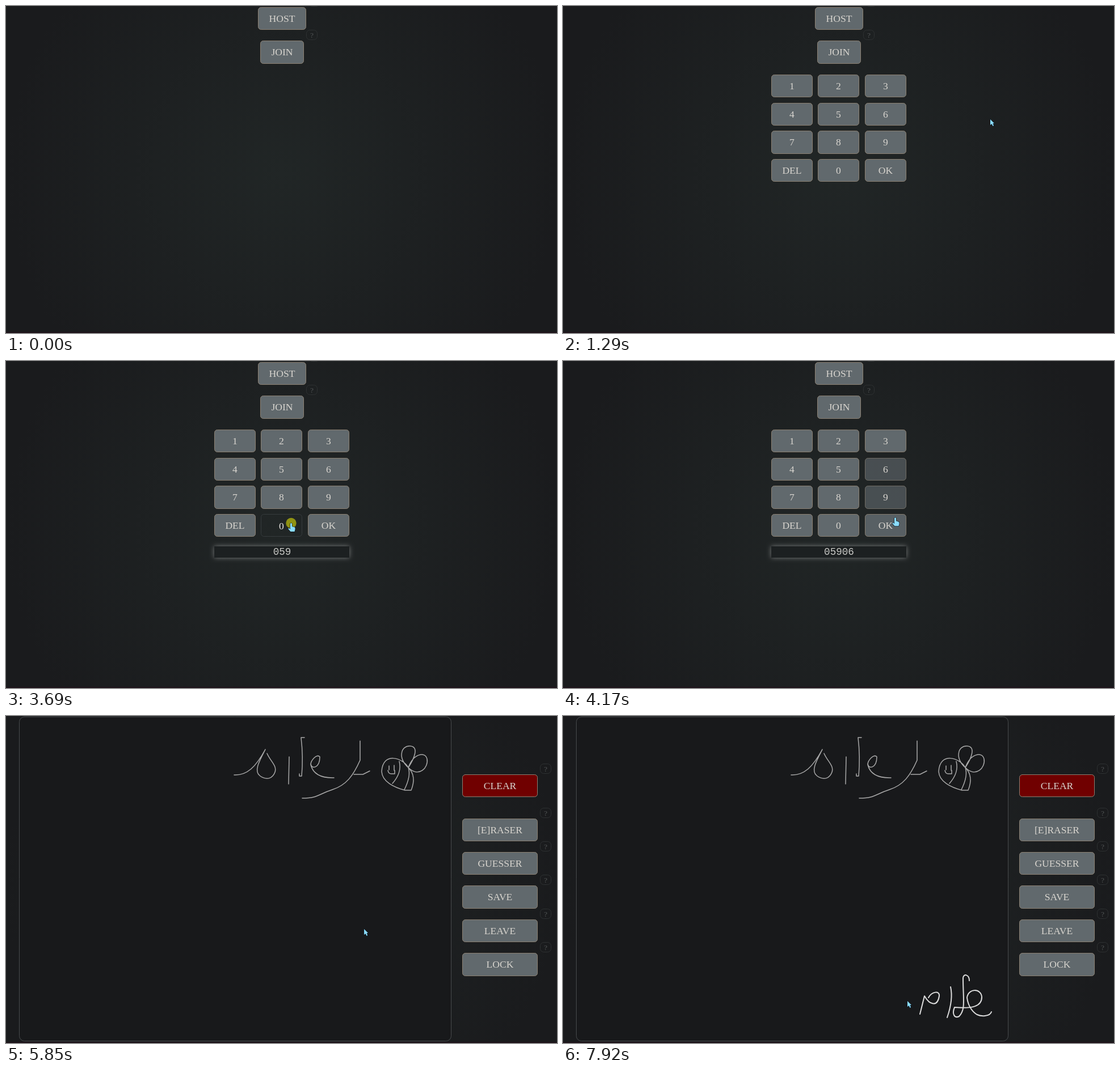
These frames come from a looping animation (971x577 px, 8000 ms). An HTML page with a canvas:

```html
<!DOCTYPE html>
<html lang="en">
<head>
<meta charset="utf-8">
<title>Shared drawing board</title>
<style>
  html, body { margin: 0; width: 100%; height: 100%; overflow: hidden; background: #1b1d1f; }
  canvas { display: block; }
</style>
</head>
<body>
<canvas id="stage" width="971" height="577"></canvas>
<svg width="0" height="0" style="position:absolute">
  <g fill="none">
    <path class="pen" d="M755 522C752 531 736 530 730 527S714 514 712 497C714 480 737 480 738 496C738 512 722 517 690 514C685 526 690 534 698 530C710 518 705 500 705 462C706 454 716 456 716 467"/>
    <path class="pen" d="M683 478Q688 500 677 532"/>
    <path class="pen" d="M644 497C650 486 664 484 663 494C660 514 646 510 637 494L629 526"/>
  </g>
</svg>
<script>
const ctx = document.getElementById('stage').getContext('2d');
const LOOP = 8000, KEYPAD_AT = 900, BOARD_AT = 4500, HOLD = 70;
const SERIF = '17.6px "Liberation Serif", "Times New Roman", serif';
const SMALL = '13.5px "Liberation Serif", "Times New Roman", serif';
const MONO = '17.6px "Liberation Mono", "Courier New", monospace';

const button = (label, x, y, w, help = false, color = '#61696d') => {
  const top = Math.round(y);
  return { label, x, y: top, w, h: Math.round(y + 40.4) - top, help, color };
};
const menu = [button('HOST', 444, 2, 85, true), button('JOIN', 448, 61.4, 77, true)];
const keys = ['1', '2', '3', '4', '5', '6', '7', '8', '9', 'DEL', '0', 'OK'].map((label, i) =>
  button(label, Math.round(367 + 82.4 * (i % 3)), 120.8 + 49.7 * Math.floor(i / 3), 73));
const tools = ['CLEAR', '[E]RASER', 'GUESSER', 'SAVE', 'LEAVE', 'LOCK'].map((label, i) =>
  button(label, 804, i ? 121.2 + 59.4 * i : 102.6, 133, true, i ? '#61696d' : '#700000'));

const lettering = new Path2D(
  'M402 104C425 105 440 90 457 59C446 80 436 98 448 106S470 110 474 99S466 80 460 66' +
  'M499 72L498 120M526 38H520Q524 72 521 106H517V102' +
  'M537 84C538 95 553 92 553 72C548 66 537 78 537 86Q543 110 578 109' +
  'M624 44V78C612 105 600 122 575 130S550 145 522 145M613 103H629L641 97');
const bee = new Path2D(
  'M709 91C700 74 664 62 662 98C663 116 684 126 703 131H714Q724 106 709 91' +
  'C690 74 696 52 712 53S720 74 709 91C718 66 739 62 742 76S728 110 709 91Q714 106 702 130' +
  'M693 80Q698 100 681 119M675 88V95M684 87V96M673 96Q674 102 679 102H685V96');

const [word, stem, loop] = [...document.querySelectorAll('.pen')].map(el => ({
  el, length: el.getTotalLength(), shape: new Path2D(el.getAttribute('d')),
  from: el.getPointAtLength(0)
}));

// Cursor legs: start, duration, then a key label, a point or a pen stroke.
const legs = [
  [600, 120, 'JOIN'], [930, 210, [695, 141]], [1290, 0, [752, 199]], [1600, 80, [762, 228]],
  [1810, 50, [772, 231]], [2280, 210, [497, 297]],
  [2820, 130, '5'], [3060, 130, '9'], [3300, 140, '0'], [3780, 150, '6'], [4050, 150, 'OK'],
  [4500, 240, [621, 375]], [5340, 0, [630, 375]],
  [5840, 680, word.from], [6560, 680, word], [7240, 30, stem.from], [7270, 60, stem],
  [7330, 40, loop.from], [7370, 330, loop], [7710, 180, [606, 502]]
].map(([start, duration, target]) => ({ start, end: start + duration, ...destination(target) }));
const strokes = legs.filter(leg => leg.pen);
const presses = [870, 2730, 2980, 3220, 3690, 3950, 4250];

function destination(target) {
  if (target.el) {
    const end = target.el.getPointAtLength(target.length);
    return { pen: target, to: [end.x, end.y] };
  }
  if (target.x) return { to: [target.x, target.y] };
  if (Array.isArray(target)) return { to: target };
  const b = [...menu, ...keys].find(k => k.label === target);
  return { to: [b.x + b.w / 2 + 17, b.y + 16] };
}

const progress = (t, a, b) => b > a ? Math.min(1, Math.max(0, (t - a) / (b - a))) : +(t >= a);
const smooth = u => u * u * (3 - 2 * u);
const pulse = (t, start) => 1 + 0.025 * (1 - Math.cos(2 * Math.PI * progress(t, start, start + 250)));

function cursorAt(t) {
  const i = legs.findLastIndex(leg => leg.start <= t);
  if (i < 0) return [-99, -99];
  const { start, end, to, pen } = legs[i], u = progress(t, start, end);
  if (pen) {
    const p = pen.el.getPointAtLength(u * pen.length);
    return [p.x, p.y];
  }
  const from = i ? legs[i - 1].to : [620, 49];
  return to.map((v, c) => from[c] + (v - from[c]) * smooth(u));
}

const inside = (b, [x, y]) => x >= b.x && x <= b.x + b.w && y >= b.y && y <= b.y + b.h;
const screenButtons = t => t >= BOARD_AT ? tools : t >= KEYPAD_AT ? [...menu, ...keys] : menu;

// Every released press adds the digit that lies under the cursor.
const typedCode = t => presses.filter(p => t >= p + HOLD)
  .map(p => keys.find(k => k.label.length === 1 && inside(k, cursorAt(p)))?.label ?? '').join('');

function box(x, y, w, h, r, fill, stroke) {
  ctx.beginPath();
  ctx.roundRect(x + 0.5, y + 0.5, w - 1, h - 1, r);
  ctx.fillStyle = fill;
  ctx.fill();
  ctx.strokeStyle = stroke;
  ctx.lineWidth = 1;
  ctx.stroke();
}

function text(str, x, y, font, color) {
  ctx.font = font;
  ctx.fillStyle = color;
  ctx.textAlign = 'center';
  ctx.fillText(str, x, y);
}

function drawHelp(x, y, glow) {
  box(x, y, 20, 18, 6, `rgba(20,85,150,${0.4 * glow})`, '#2e3132');
  text('?', x + 10, y + 14, SMALL, '#505354');
  if (glow) text('?', x + 10, y + 14, SMALL, `rgba(40,120,184,${glow})`);
}

function drawButton(b, { t, pressed, trail }) {
  const hover = trail.filter(p => inside(b, p)).length / trail.length;
  const sink = pressed && inside(b, trail[0]) ? 1 : 0;
  box(b.x, b.y, b.w, b.h, 5, 'transparent', '#363b3d');
  ctx.globalAlpha = 1 - hover;
  box(b.x, b.y, b.w, b.h, 5, b.color, '#8b8072');
  ctx.globalAlpha = 1;
  text(b.label, b.x + b.w / 2, b.y + 26 + sink, SERIF, hover > 0.5 ? '#e6e4e0' : '#d8d5cf');
  const glow = b.label === 'CLEAR' ? progress(t, 6530, 6630) - progress(t, 7200, 7440) : 0;
  if (b.help) drawHelp(b.x + b.w + 4, b.y - 19, glow);
}

function scaled(cx, cy, s, draw) {
  ctx.save();
  ctx.translate(cx, cy);
  ctx.scale(s, s);
  ctx.translate(-cx, -cy);
  draw();
  ctx.restore();
}

function drawBoard(t) {
  ctx.lineCap = ctx.lineJoin = 'round';
  scaled(404, 287.5, pulse(t, BOARD_AT), () => {
    box(23, 1, 762, 573, 9, '#18191b', '#484b4d');
    ctx.strokeStyle = '#a9a9a9';
    ctx.lineWidth = 1.5;
    ctx.stroke(lettering);
    ctx.stroke(bee);
  });
  ctx.strokeStyle = '#dcdcdc';
  ctx.lineWidth = 2;
  for (const { start, end, pen } of strokes) {
    if (t <= start) continue;
    ctx.setLineDash([pen.length * progress(t, start, end), pen.length + 9]);
    ctx.stroke(pen.shape);
  }
  ctx.setLineDash([]);
}

function drawCode(code) {
  ctx.save();
  ctx.shadowColor = 'rgba(255,255,255,.4)';
  ctx.shadowBlur = 8;
  ctx.fillStyle = '#1c2021';
  ctx.fillRect(367, 327, 238, 20);
  ctx.restore();
  text(code, 486.5, 342, MONO, '#c9c9c6');
}

const arrow = new Path2D('M1 1V11L3.5 9L5.5 13L7 12L5.5 8H8Z');
const hand = new Path2D('M-1.5 1Q0-1 1.5 1V6L6 7.3Q7.5 8 7 11L6 15H-1L-5 10.5Q-5 8.5-3.3 9L-1.5 11Z');

function drawCursor({ t, pressed, trail: [at] }) {
  if (pressed) {
    ctx.beginPath();
    ctx.arc(...at, 9.2, 0, 2 * Math.PI);
    ctx.fillStyle = 'rgba(255,255,0,.5)';
    ctx.fill();
  }
  const shape = screenButtons(t).some(b => inside(b, at)) ? hand : arrow;
  ctx.save();
  ctx.translate(...at);
  ctx.lineWidth = 1.2;
  ctx.strokeStyle = '#101a20';
  ctx.stroke(shape);
  ctx.fillStyle = '#8adcff';
  ctx.fill(shape);
  ctx.restore();
}

const backdrop = ctx.createRadialGradient(488, 295, 0, 488, 295, 490);
backdrop.addColorStop(0, '#212626');
backdrop.addColorStop(1, '#1a1b1d');

function render(t) {
  const pressed = presses.some(p => t >= p && t < p + HOLD) ||
    strokes.some(s => t >= s.start && t < s.end);
  // Recent cursor positions: their share inside a button is its hover fade.
  const trail = Array.from({ length: 8 }, (_, k) => cursorAt(t - 15 * k));
  const now = { t, pressed, trail };

  ctx.fillStyle = backdrop;
  ctx.fillRect(0, 0, 971, 577);
  ctx.fillStyle = '#1d1219';
  ctx.fillRect(0, 575, 971, 2);

  if (t >= BOARD_AT) {
    drawBoard(t);
    tools.forEach(b => drawButton(b, now));
  } else {
    menu.forEach(b => drawButton(b, now));
    if (t >= KEYPAD_AT) {
      scaled(486, 215.5, pulse(t, KEYPAD_AT), () => keys.forEach(b => drawButton(b, now)));
    }
    const code = typedCode(t);
    if (code) drawCode(code);
  }
  drawCursor(now);
}

function frame() {
  render(performance.now() % LOOP);
  requestAnimationFrame(frame);
}
frame();
</script>
</body>
</html>
```
